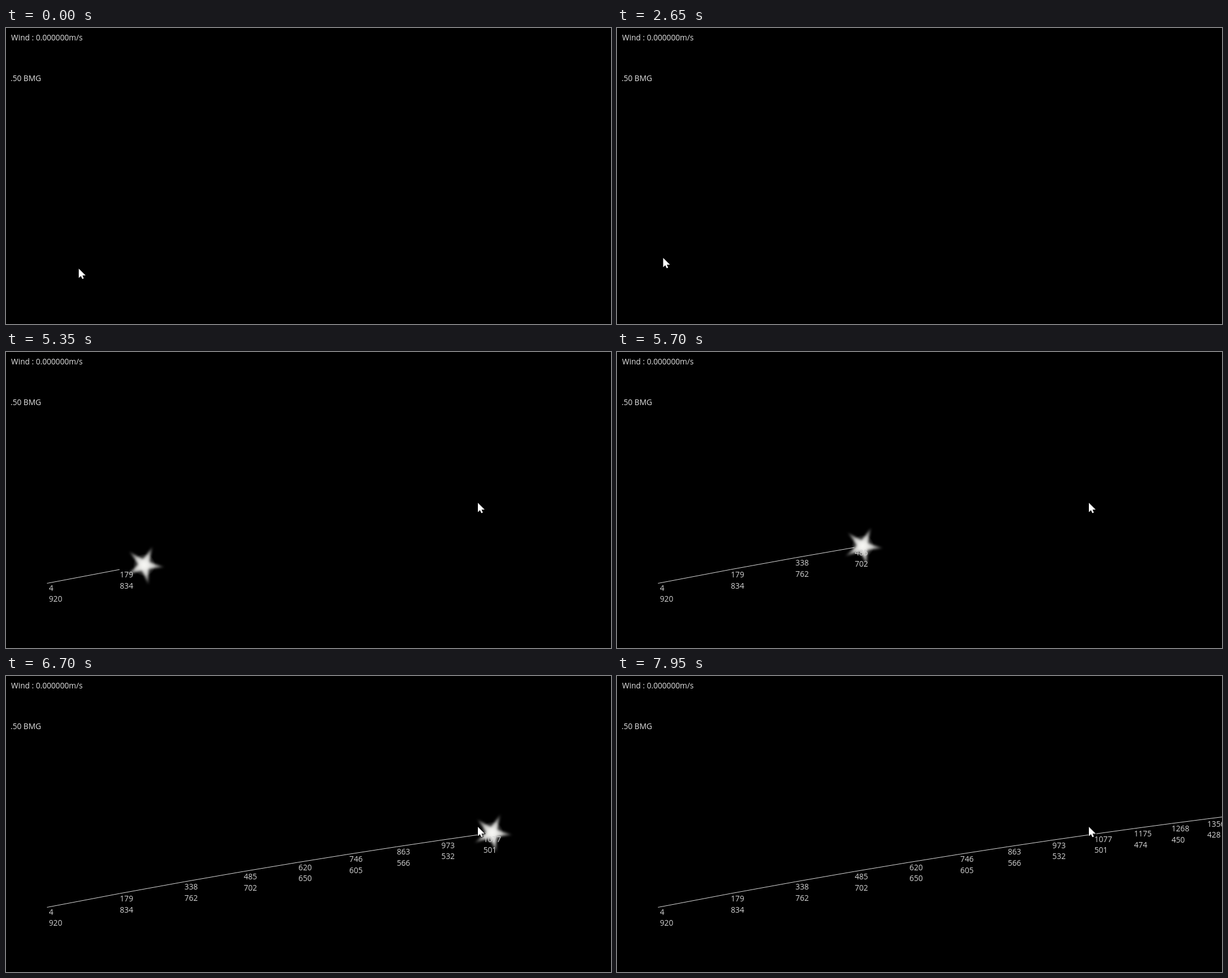
An HTML page with a canvas that plays this animation: 1068 px wide and 524 px high, repeating every 8000 ms.

```html
<!DOCTYPE html>
<html>
<head>
<meta charset="utf-8">
<style>
html, body { margin: 0; width: 100%; height: 100%; overflow: hidden; background: #000; }
canvas { display: block; }
</style>
</head>
<body>
<canvas id="stage" width="1068" height="524"></canvas>
<script>
const ctx = document.getElementById('stage').getContext('2d');
const LOOP = 8000, STEP = 50, FIRED = 5080, MARK_TIME = 197, LAST_MARK = 12;

// Ballistics: s counts marks since the shot, drag slows the bullet
const rangeAt = s => 4 + 1775.5 * Math.log(1 + 0.1038 * s);
const speedAt = s => 920.8 / (1 + 0.1035 * s + 0.0001 * s * s);

function pointAt(range) {
  return [72.4 + 0.7145 * range, 409.5 - 0.1393 * range + 1.76e-5 * range * range];
}

// time, x, y of the pointer tip, eased between
const pointer = [
  [0, 128.5, 426], [900, 128.5, 426], [1700, 104, 407], [2650, 81.5, 407],
  [4040, 82, 414], [4650, 838.5, 277], [4950, 833, 267], [LOOP, 833, 267]
];

function pointerAt(t) {
  const i = pointer.findIndex(p => p[0] > t);
  const [t0, x0, y0] = pointer[i - 1], [t1, x1, y1] = pointer[i];
  const k = (t - t0) / (t1 - t0), ease = k * k * (3 - 2 * k);
  return [x0 + (x1 - x0) * ease, y0 + (y1 - y0) * ease];
}

function glow(radius, middle, edge) {
  const g = ctx.createRadialGradient(0, 0, 0, 0, 0, radius);
  [1, middle, edge].forEach((alpha, i) =>
    g.addColorStop(i / 2, `rgba(245,245,242,${alpha})`));
  return g;
}

function drawStar(x, y, scale, alpha) {
  ctx.save();
  ctx.translate(x, y);
  ctx.scale(scale, scale);
  ctx.globalAlpha = alpha;
  ctx.filter = `blur(${2 * scale}px)`;
  ctx.beginPath();
  for (let i = 0; i < 10; i++) {
    const a = (6 + 36 * i) * Math.PI / 180, r = i % 2 ? 10 : 36;
    ctx.lineTo(r * Math.cos(a), r * Math.sin(a));
  }
  ctx.closePath();
  ctx.fillStyle = glow(36, 0.75, 0.15);
  ctx.fill();
  ctx.filter = 'none';
  ctx.fillStyle = glow(20, 0.4, 0);
  ctx.fillRect(-20, -20, 40, 40);
  ctx.restore();
}

function drawShot(t) {
  const s = (t - FIRED) / MARK_TIME;
  if (s < 0) return;
  const count = Math.min(Math.floor(s), LAST_MARK) + 1;
  const marks = Array.from({ length: count }, (_, i) => i);
  const gun = pointAt(0);

  ctx.strokeStyle = '#dcdcdc';
  ctx.lineWidth = 1;
  ctx.beginPath();
  ctx.moveTo(...gun);
  marks.forEach(i => ctx.lineTo(...pointAt(rangeAt(i))));
  ctx.stroke();

  if (s < LAST_MARK) drawStar(...pointAt(rangeAt(s)), 1, 1);
  if (t >= 5150 && t < 5250) drawStar(...gun, 2, t < 5200 ? 1 : 0.5);

  ctx.fillStyle = '#d4d4d4';
  marks.forEach(i => {
    const [x, y] = pointAt(rangeAt(i));
    ctx.fillText(Math.floor(rangeAt(i)), x + 0.5, y + 14);
    ctx.fillText(Math.floor(speedAt(i)), x + 0.5, y + 33.5);
  });
}

function drawPointer(x, y) {
  ctx.save();
  ctx.translate(x, y);
  ctx.beginPath();
  [[0, 0], [0, 16.5], [3.7, 13], [6.2, 18.3], [8.8, 17.2], [6.5, 12], [12, 12]]
    .forEach(p => ctx.lineTo(...p));
  ctx.closePath();
  ctx.strokeStyle = '#000';
  ctx.lineWidth = 1.5;
  ctx.stroke();
  ctx.fillStyle = '#fff';
  ctx.fill();
  ctx.restore();
}

function draw(now) {
  const t = Math.floor(now % LOOP / STEP) * STEP;
  ctx.fillStyle = '#000';
  ctx.fillRect(0, 0, 1068, 524);
  ctx.font = '13.7px "Open Sans", "Noto Sans", sans-serif';
  ctx.fillStyle = '#e2e2e2';
  ctx.fillText('Wind : 0.000000m/s', 9, 22);
  ctx.fillText('.50 BMG', 8, 94);
  drawShot(t);
  drawPointer(...pointerAt(t));
}

const start = performance.now();
function tick() {
  draw(performance.now() - start);
  requestAnimationFrame(tick);
}
tick();
</script>
</body>
</html>
```
